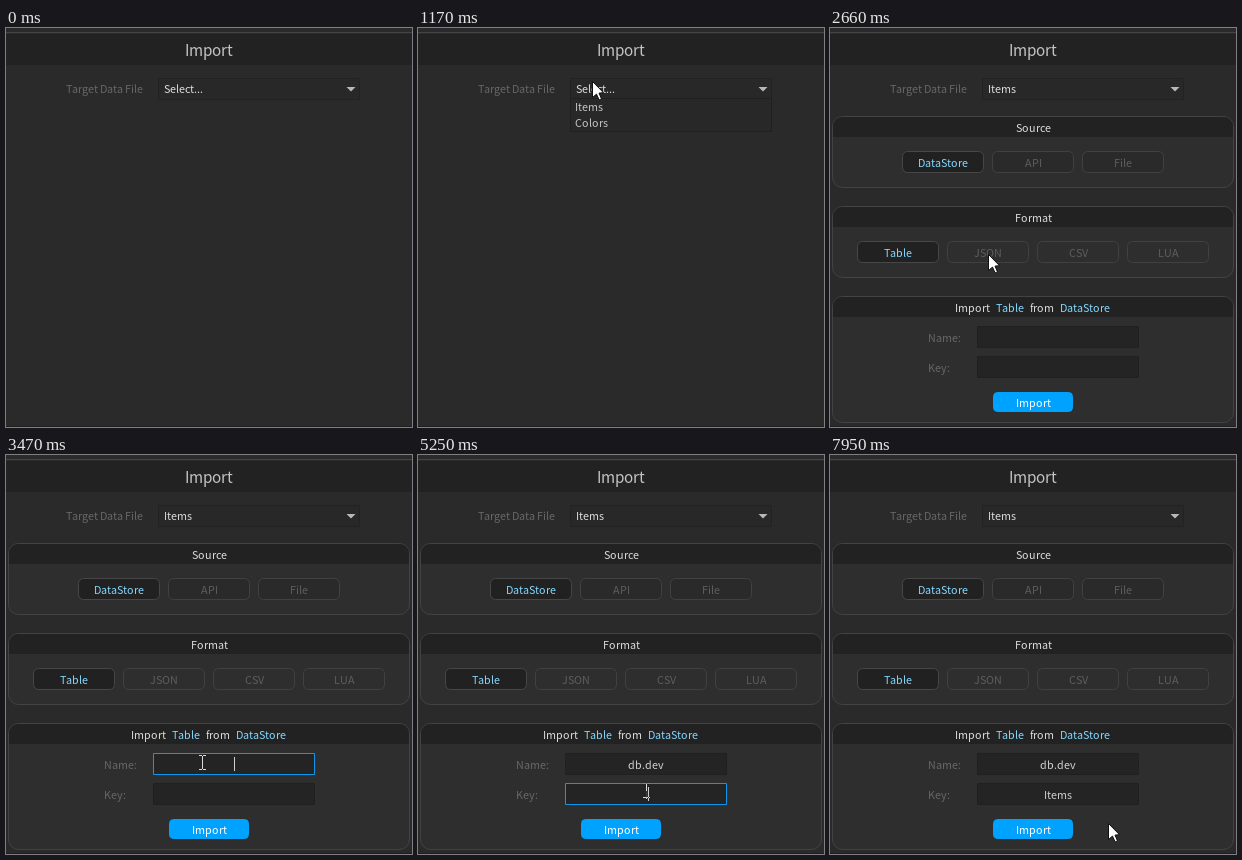
These frames come from a looping animation (406 px wide and 399 px high, 7.99 s). An HTML page with a canvas:

```html
<!DOCTYPE html>
<html lang="en">
<head>
<meta charset="utf-8">
<title>Import panel</title>
<style>
  html, body { margin: 0; width: 100%; height: 100%; overflow: hidden; background: #2a2a2a; }
  canvas { display: block; width: 406px; height: 399px; }
</style>
</head>
<body>
<canvas id="stage" width="406" height="399"></canvas>
<script>
const LOOP = 7990;
const BLINK = 290;
const MIDDLE = 203.5;
const TEXT = 12;
const FAMILY = '"Noto Sans CJK JP", "Noto Sans CJK SC", "Noto Sans CJK", "Open Sans", sans-serif';
const FONT_SCALE = 1 / 1.115;

const ctx = document.getElementById('stage').getContext('2d');

const color = {
  bg: '#2a2a2a', bar: '#222222', panel: '#2e2e2e', edge: '#434343', title: '#c4c4c4',
  text: '#dcdcdc', item: '#c4c4c4', dim: '#676767', off: '#5e5e5e', accent: '#84d8ff',
  blue: '#00a2ff', menu: '#282828', input: '#242424', line: '#202020'
};

// Moments of the interaction, in ms
const at = { show: 160, open: 1060, hover: 1620, pick: 1830, name: 3270, paste: 3630, key: 4340, done: 7000 };
const word = 'Items';
const strokes = [5250, 5460, 5630, 5830, 5920];

// Pointer moves, each from where the last one ended; bend bows the path sideways
const origin = { x: 267, y: 371 };
const moves = [
  { from: 160, to: 840, x: 167, y: 39, bend: -35 },
  { from: 920, to: 1420, x: 180, y: 67 },
  { from: 1540, to: 1670, x: 184, y: 77 },
  { from: 2170, to: 2990, x: 196, y: 307, bend: -38 },
  { from: 3560, to: 3680, x: 205, y: 338 },
  { from: 3840, to: 4340, x: 228, y: 335 },
  { from: 6790, to: 7000, x: 228, y: 344 },
  { from: 7460, to: 7580, x: 331, y: 312 },
  { from: 7740, to: 7950, x: 278, y: 368, bend: 8 }
];

const fields = { name: 298, key: 328 };

const advances = {};
function advance(ch, size) {
  if (!(ch in advances)) {
    ctx.font = `100px ${FAMILY}`;
    advances[ch] = ctx.measureText(ch).width / 100;
  }
  return Math.round(advances[ch] * size * FONT_SCALE);
}

function textWidth(str, size = TEXT) {
  return [...str].reduce((sum, ch) => sum + advance(ch, size), 0);
}

// Glyphs sit on whole pixels; returns where the text ends
function text(str, x, y, fill, size = TEXT) {
  const steps = [...str].map(ch => advance(ch, size));
  ctx.font = `${size * FONT_SCALE}px ${FAMILY}`;
  ctx.fillStyle = fill;
  [...str].forEach((ch, i) => {
    ctx.fillText(ch, x, y);
    x += steps[i];
  });
  return x;
}

function centered(str, cx, y, fill, size) {
  return text(str, Math.round(cx - textWidth(str, size) / 2), y, fill, size);
}

function rect(x, y, w, h, fill) {
  ctx.fillStyle = fill;
  ctx.fillRect(x, y, w, h);
}

function box(x, y, w, h, fill, stroke, r = 0) {
  ctx.beginPath();
  ctx.roundRect(x + 0.5, y + 0.5, w - 1, h - 1, r);
  ctx.fillStyle = fill;
  ctx.fill();
  ctx.lineWidth = 1;
  ctx.strokeStyle = stroke;
  ctx.stroke();
}

function panel(y, h, title = '') {
  box(2, y, 402, h, color.panel, color.edge, 10);
  ctx.save();
  ctx.beginPath();
  ctx.roundRect(3, y + 1, 400, h - 2, 9);
  ctx.clip();
  rect(3, y + 1, 400, 20, color.bar);
  ctx.restore();
  centered(title, MIDDLE, y + 16, color.text);
}

function options(labels, x, y, offFill) {
  labels.forEach((label, i) => {
    const left = x + i * 90;
    const on = i === 0;
    box(left, y, 82, 22, on ? '#212121' : offFill, on ? '#474747' : '#414141', 5);
    centered(label, left + 41, y + 16, on ? color.accent : color.off);
  });
}

function header() {
  rect(0, 0, 406, 399, color.bg);
  rect(0, 4, 406, 1, '#444444');
  rect(0, 6, 406, 31, color.bar);
  rect(0, 398, 406, 1, '#201d1f');
  centered('Import', MIDDLE - 0.5, 28, color.title, 17);
  text('Target Data File', 60, 65, color.dim);
}

function dropdown(t) {
  box(152, 50, 202, 22, color.menu, '#222222');
  text(t < at.pick ? 'Select...' : word, 158, 65, color.text);
  ctx.beginPath();
  ctx.moveTo(340.5, 59);
  ctx.lineTo(349.5, 59);
  ctx.lineTo(345, 63.5);
  ctx.fillStyle = '#b8b8b8';
  ctx.fill();
  if (t < at.open || t >= at.pick) return;
  box(152, 70, 202, 34, color.menu, color.line);
  if (t >= at.hover) rect(153, 71, 200, 16, '#3a3a3a');
  [word, 'Colors'].forEach((item, i) => text(item, 157, 83 + i * 16, color.item));
}

function field(label, y, value, focused, since, t) {
  text(label, 98, y + 16, color.dim);
  box(147, y, 162, 22, color.input, focused ? '#0d98ee' : color.line);
  const end = centered(value, 228, y + 16, '#d0d0d0');
  const lit = Math.floor((t - since) / BLINK) % 2 === 0;
  if (focused && lit) rect(end, y + 4, 1, 14, '#d0d0d0');
}

function nameField(t) {
  const pasted = t >= at.paste;
  const focused = t >= at.name && t < at.key;
  field('Name:', fields.name, pasted ? 'db.dev' : '', focused, pasted ? at.paste : at.name, t);
}

function keyField(t) {
  const typed = strokes.filter(s => s <= t).length;
  const focused = t >= at.key && t < at.done;
  field('Key:', fields.key, word.slice(0, typed), focused, typed ? strokes[typed - 1] : at.key, t);
}

function formTitle() {
  let x = 125;
  ['Import', 'Table', 'from', 'DataStore'].forEach((part, i) => {
    x = text(part, x, 284, i % 2 ? color.accent : color.text) + 6;
  });
}

function form(t) {
  panel(88, 72, 'Source');
  options(['DataStore', 'API', 'File'], 72, 123, color.bg);
  panel(178, 72, 'Format');
  options(['Table', 'JSON', 'CSV', 'LUA'], 27, 213, color.panel);
  panel(268, 127);
  formTitle();
  nameField(t);
  keyField(t);
  box(163, 364, 80, 20, color.blue, color.blue, 4);
  centered('Import', MIDDLE, 379, '#ffffff');
}

function pointerAt(t) {
  let { x, y } = origin;
  for (const move of moves) {
    if (t < move.from) break;
    const p = Math.min(1, (t - move.from) / (move.to - move.from));
    const k = p * p * (3 - 2 * p);
    x += (move.x - x) * k + (move.bend || 0) * Math.sin(Math.PI * k);
    y += (move.y - y) * k;
  }
  return [Math.round(x), Math.round(y)];
}

function arrow() {
  const shape = [[0, 0], [0, 16], [4, 12.6], [6.6, 18.4], [9, 17.4], [6.5, 11.6], [11, 11.2]];
  ctx.beginPath();
  shape.forEach(([x, y]) => ctx.lineTo(x + 0.5, y + 0.5));
  ctx.closePath();
  ctx.fillStyle = '#ffffff';
  ctx.fill();
  ctx.lineWidth = 1;
  ctx.strokeStyle = '#111111';
  ctx.stroke();
}

// The text pointer inverts what lies under it
function beam() {
  ctx.globalCompositeOperation = 'difference';
  rect(0, -6, 1, 13, '#ffffff');
  for (const y of [-7, 7]) {
    rect(-3, y, 3, 1, '#ffffff');
    rect(1, y, 3, 1, '#ffffff');
  }
}

function pointer(t) {
  if (t < at.show) return;
  const [x, y] = pointerAt(t);
  const inField = t >= at.pick && x > 147 && x < 309 &&
    Object.values(fields).some(top => y >= top && y < top + 22);
  ctx.save();
  ctx.translate(x, y);
  inField ? beam() : arrow();
  ctx.restore();
}

function draw(t) {
  header();
  dropdown(t);
  if (t >= at.pick) form(t);
  pointer(t);
}

ctx.fontKerning = 'none';
const start = performance.now();
function tick() {
  draw((performance.now() - start) % LOOP);
  requestAnimationFrame(tick);
}
tick();
</script>
</body>
</html>
```
